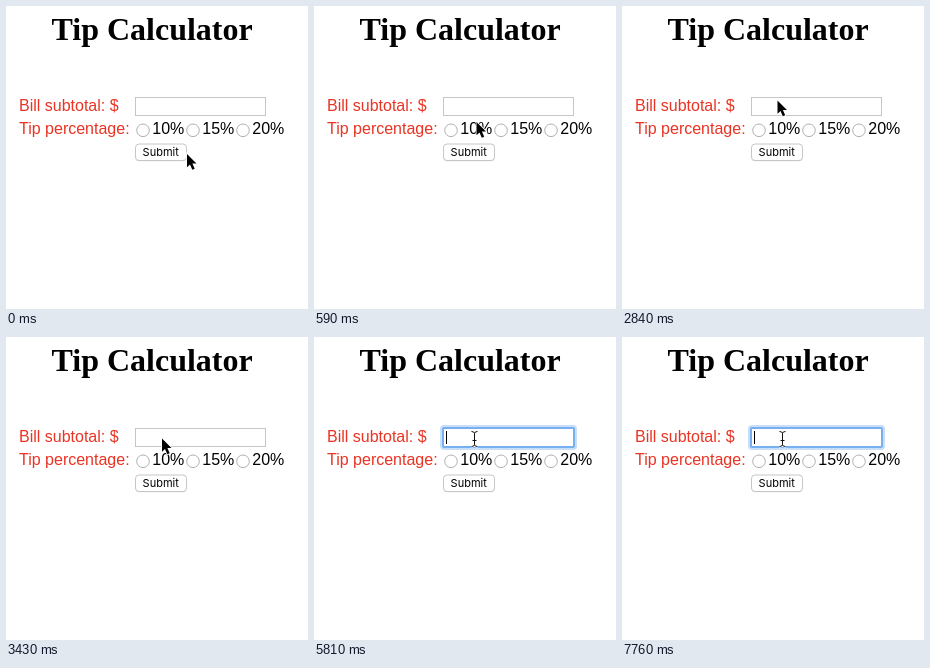
Write an HTML page that moves like this. It is 302x303 px and loops after 8 s.

```html
<!DOCTYPE html>
<html lang="en">
<head>
<meta charset="utf-8">
<title>Tip Calculator</title>
<style>
  html, body { margin: 0; width: 100%; height: 100%; overflow: hidden; background: #fff; }
  svg { display: block; width: 302px; height: 303px; }
  text { font: 16px "Liberation Sans", Arial, sans-serif; }
  .title { font: bold 32px "Liberation Serif", Times, serif; }
  .label { fill: #e93323; }
  .button { font: 11px Inter, sans-serif; text-anchor: middle; }
  .box { fill: #fff; stroke: #c6c6c6; }
  .ring { fill: none; }
</style>
</head>
<body>
<svg viewBox="0 0 302 303">
  <text class="title" x="45.5" y="34">Tip Calculator</text>
  <text class="label" x="13" y="105">Bill subtotal: $</text>
  <text class="label" x="13" y="128">Tip percentage:</text>

  <rect class="box" x="129.5" y="91.5" width="130" height="18"/>
  <g id="focus">
    <rect class="ring" x="128" y="90" width="133" height="21" rx="2" stroke="#c9def8" stroke-width="4"/>
    <rect class="ring" x="129" y="91" width="131" height="19" rx="1" stroke="#78aff0" stroke-width="2"/>
  </g>
  <rect id="caret" x="132" y="94" width="1" height="13"/>

  <g id="options"></g>

  <rect x="129.5" y="138.8" width="51" height="16.5" rx="3.5" fill="#ddd"/>
  <rect class="box" x="129.5" y="138" width="51" height="16.5" rx="3.5"/>
  <text class="button" x="154.7" y="150">Submit</text>

  <path id="arrow" d="M1 1V14.2L4 11.4L6.3 16.8L8.7 15.8L6.4 10.5H10.5Z"
        stroke="#fff" stroke-width="1.6" paint-order="stroke"/>
  <g id="beam" fill="none">
    <path id="stem" d="M-3 .5Q0 .5 0 2.5Q0 .5 3 .5M0 2.5V13.5M-3 15.5Q0 15.5 0 13.5Q0 15.5 3 15.5M-2 9.5H2"
          stroke="#fff" stroke-width="2"/>
    <use href="#stem" style="stroke:#111"/>
    <path d="M-3 .5Q0 .5 0 2.5Q0 .5 3 .5M0 2.5V13.5M-3 15.5Q0 15.5 0 13.5Q0 15.5 3 15.5M-2 9.5H2"
          stroke="#111"/>
  </g>
</svg>
<script>
const LOOP = 8000;
const $ = id => document.getElementById(id);

$('options').innerHTML = [10, 15, 20].map((tip, i) => {
  const x = 137 + 50 * i;
  return `<circle class="box" cx="${x}" cy="124.3" r="6.3" style="stroke:#b0b0b0"/>
          <text x="${x + 9.3}" y="128">${tip}%</text>`;
}).join('');

// Pointer positions: [time, x, y]
const arrowPath = [
  [0, 180, 147], [150, 170.5, 133], [290, 166.5, 125], [440, 164.5, 118],
  [590, 161.5, 115], [740, 159, 108], [890, 157.5, 99], [1040, 154, 93],
  [2840, 154.5, 93.5], [2980, 154.5, 96], [3130, 154.5, 98],
  [3280, 154.5, 99], [3430, 155, 100.5]
];
const beamPath = [[5220, 157.5, 94], [5370, 160.5, 94]];
const caretFlips = [5810, 6260, 6710, 7310, 7760];

const show = (id, on) => $(id).setAttribute('visibility', on ? 'visible' : 'hidden');

function place(id, path, t) {
  const [, x, y] = path.findLast(step => step[0] <= t) || path[0];
  $(id).setAttribute('transform', `translate(${x} ${y})`);
}

let start;
function draw(now) {
  start ??= now;
  const t = (now - start) % LOOP;
  place('arrow', arrowPath, t);
  place('beam', beamPath, t);
  show('arrow', t < beamPath[0][0]);
  show('beam', t >= beamPath[0][0]);
  show('focus', t >= caretFlips[0]);
  show('caret', caretFlips.filter(flip => flip <= t).length % 2);
  requestAnimationFrame(draw);
}
requestAnimationFrame(draw);
</script>
</body>
</html>
```
